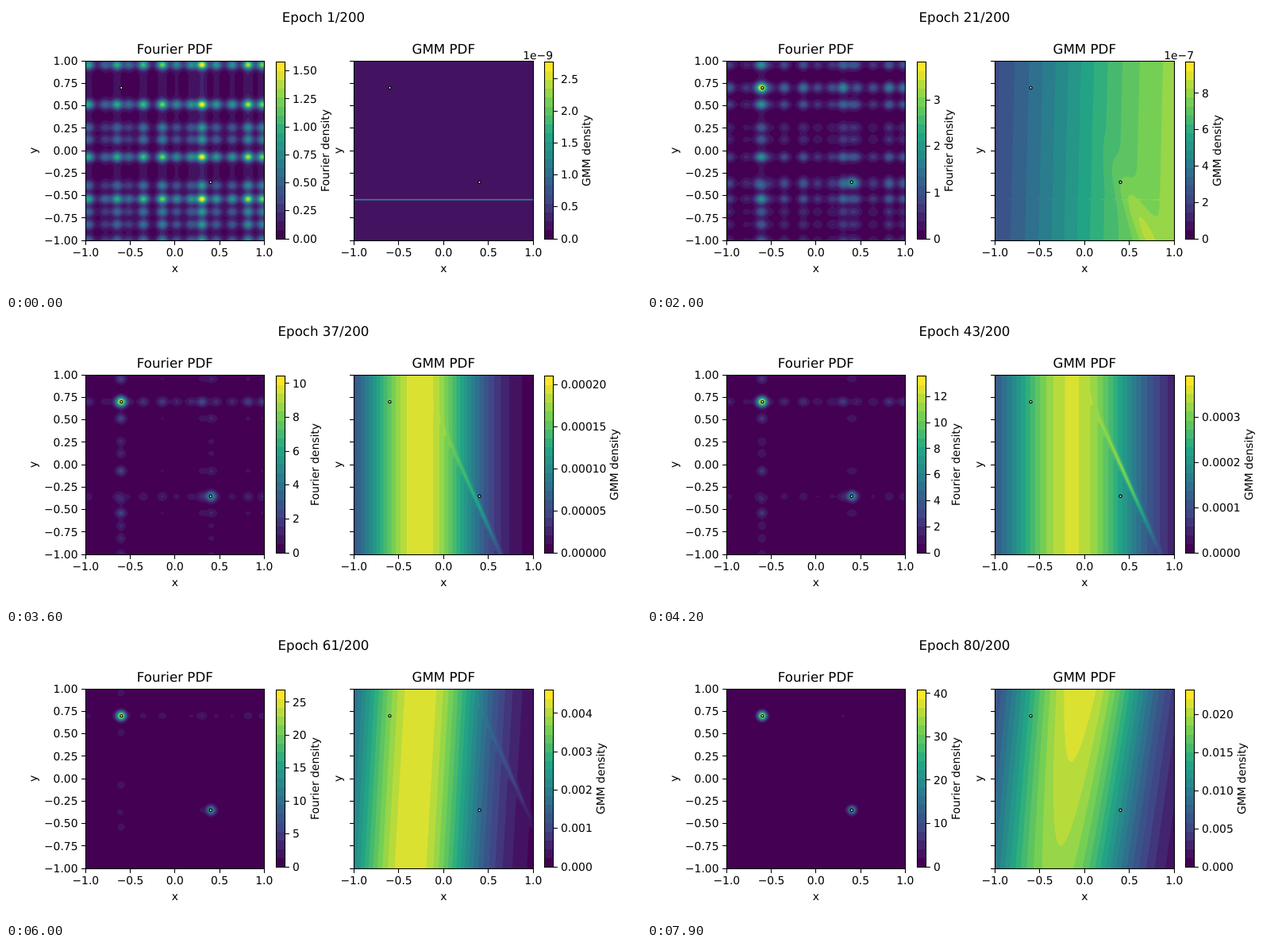
Recreate the animation shown at these times as an HTML page with a canvas. Size 800 by 360 pixels, loop 8 s.

```html
<!DOCTYPE html>
<html lang="en">
<head>
<meta charset="utf-8">
<title>Density training</title>
<style>
  html, body { margin: 0; width: 100%; height: 100%; overflow: hidden; background: #fff; }
  #stage { position: relative; width: 800px; height: 360px; }
  canvas { position: absolute; top: 69px; width: 226px; height: 226px; }
  #fourier { left: 100px; }
  #gmm { left: 438px; }
  svg { position: absolute; left: 0; top: 0; }
  text { font: 13.89px "DejaVu Sans", sans-serif; fill: #000; text-rendering: geometricPrecision; }
  .title { font-size: 16.67px; }
</style>
</head>
<body>
<div id="stage">
  <canvas id="fourier" width="452" height="452"></canvas>
  <canvas id="gmm" width="452" height="452"></canvas>
  <svg width="800" height="360" viewBox="0 0 800 360">
    <g id="axes"></g>
    <g id="live"></g>
  </svg>
</div>
<script>
const SIZE = 452, BANDS = 20, STEP_MS = 100, EPOCHS = 80;
const TOP = 69, BOTTOM = 295, BAR_TOP = 71, BAR_BOTTOM = 293;
const POINTS = [{ x: -0.6, y: 0.7 }, { x: 0.4, y: -0.35 }];

const mix = (a, b, u) => a + (b - a) * u;
const bell = d => Math.exp(-d * d / 2);
const coord = i => 2 * (i + 0.5) / SIZE - 1;
const snap = v => Math.floor(v) + 0.5;

// Linear motion through [epoch, value] points, held at both ends.
function track(...points) {
  return epoch => {
    const next = points.findIndex(p => p[0] > epoch);
    if (next < 0) return points[points.length - 1][1];
    if (next === 0) return points[0][1];
    const [e0, v0] = points[next - 1], [e1, v1] = points[next];
    return mix(v0, v1, (epoch - e0) / (e1 - e0));
  };
}
function logTrack(...points) {
  const log = track(...points.map(([e, v]) => [e, Math.log(v)]));
  return epoch => Math.exp(log(epoch));
}

const fourierMax = logTrack([1, 1.575], [14, 2.374], [29, 6.57], [37, 10.42], [50, 18.4], [61, 26.8], [80, 40.7]);
const gmmMax = logTrack([1, 2.76e-9], [14, 6.5e-8], [29, 2.13e-5], [37, 2.1e-4], [50, 8.07e-4], [61, 4.6e-3], [80, 0.0232]);

const broad = {
  centre: track([14, 1.6], [29, 0.8], [37, -0.26], [50, 0], [61, -0.31], [80, -0.17]),
  lean: track([14, 0.045], [29, 0], [45, 0], [80, 0.125]),
  sharp: track([1, 0], [14, 0.54], [29, 0.89], [37, 2.13], [50, 1.36], [61, 1.87], [80, 1.72]),
  amp: track([1, 0.075], [14, 0.87], [29, 0.78], [37, 0.945], [50, 0.866], [61, 0.95], [80, 0.89]),
  tilt: track([61, 0], [80, 0.06])
};
const ridge = {
  centre: track([29, 0.27], [37, 0.19], [50, 0.65], [61, 0.77]),
  width: track([29, 0.085], [37, 0.018]),
  amp: track([14, 0], [29, 0.2], [37, 0.22], [50, 0.38], [61, 0.1], [80, 0]),
  middle: track([29, -0.8], [50, 0])
};
const lineAmp = track([1, 0.5], [14, 0.05], [25, 0]);

// Ripple crests of each axis, in stage pixels.
const X = { strong: [104, 140, 173, 197, 247, 305, 323], weak: [125, 155, 215, 233, 265, 285],
            origin: 100, width: 4.6, height: c => 0.55 + 0.45 * bell((c - 260) / 50) };
const Y = { strong: [74, 124, 190, 243], weak: [153, 168, 226, 259, 275, 295],
            origin: TOP, width: 4, height: () => 0.8 };

const VIRIDIS = ["440154", "414487", "2a788e", "22a884", "7ad151", "fde725"]
  .map(hex => [0, 2, 4].map(i => parseInt(hex.slice(i, i + 2), 16)));
const palette = Array.from({ length: BANDS }, (_, i) => {
  const pos = i / (BANDS - 1) * 5, k = Math.min(4, Math.floor(pos));
  return VIRIDIS[k].map((c, j) => Math.round(mix(c, VIRIDIS[k + 1][j], pos - k)));
});
const packed = palette.map(([r, g, b]) => (255 << 24 | b << 16 | g << 8 | r) >>> 0);

function rippleProfile(axis) {
  return Float64Array.from({ length: SIZE }, (_, i) => {
    const px = axis.origin + (i + 0.5) / 2;
    const sum = crests => crests.reduce((s, c) => s + axis.height(c) * bell((px - c) / axis.width), 0);
    return 0.1 + sum(axis.strong) + 0.5 * sum(axis.weak);
  });
}
const rippleX = rippleProfile(X), rippleY = rippleProfile(Y);

// Each term is a product of fading ripples plus a growing peak on its point.
function fourierField(epoch) {
  const fade = 0.83 * Math.exp(-0.035 * epoch);
  const grow = Math.min(1, (epoch - 1) / 28);
  const sigma = 0.041 * (1 - 0.0025 * epoch);
  const blend = (ripple, at, sign) =>
    ripple.map((r, i) => fade * r + grow * bell((sign * coord(i) - at) / sigma));
  const [a, b] = POINTS.map(p => ({ x: blend(rippleX, p.x, 1), y: blend(rippleY, p.y, -1) }));
  const value = (i, j) => a.x[i] * a.y[j] + 0.5 * b.x[i] * b.y[j];
  let max = 0;
  for (let j = 0; j < SIZE; j += 2)
    for (let i = 0; i < SIZE; i += 2) max = Math.max(max, value(i, j));
  return (i, j) => value(i, j) / max;
}

function gmmField(epoch) {
  const sharp = broad.sharp(epoch), width = ridge.width(epoch);
  const rows = Array.from({ length: SIZE }, (_, j) => {
    const y = -coord(j);
    return {
      centre: broad.centre(epoch) + broad.lean(epoch) * y,
      amp: broad.amp(epoch) * (1 + broad.tilt(epoch) * y),
      ridge: ridge.centre(epoch) - 0.45 * y,
      ridgeAmp: ridge.amp(epoch) * bell((y - ridge.middle(epoch)) / 0.4),
      line: lineAmp(epoch) * bell((y + 0.547) / 0.0045)
    };
  });
  return (i, j) => {
    const r = rows[j], x = coord(i);
    return r.amp * bell((x - r.centre) * sharp) + r.ridgeAmp * bell((x - r.ridge) / width) + r.line;
  };
}

function surface(id) {
  const ctx = document.getElementById(id).getContext("2d");
  const image = ctx.createImageData(SIZE, SIZE);
  const pixels = new Uint32Array(image.data.buffer);
  return field => {
    for (let j = 0, n = 0; j < SIZE; j++)
      for (let i = 0; i < SIZE; i++)
        pixels[n++] = packed[Math.min(BANDS - 1, Math.floor(field(i, j) * BANDS))];
    ctx.putImageData(image, 0, 0);
  };
}

const text = (x, y, str, anchor = "middle", cls = "") =>
  `<text x="${x}" y="${y}" text-anchor="${anchor}" class="${cls}">${str}</text>`;
const upright = (x, y, str) =>
  `<text transform="translate(${x} ${y}) rotate(-90)" text-anchor="middle">${str}</text>`;
const tick = (x, y, dx, dy) =>
  `<path d="M${x} ${y}l${dx} ${dy}" stroke="#000" stroke-width="1.1"/>`;
const frame = (x, y, w, h) =>
  `<rect x="${x}" y="${y}" width="${w}" height="${h}" fill="none" stroke="#000" stroke-width="1.1"/>`;
const signed = (v, digits) => (v < 0 ? "\u2212" : "") + Math.abs(v).toFixed(digits);
const beside = y => Math.round(y + 4.7);

function panel(left, right, title, labelled) {
  const px = v => mix(left + 0.3, right + 0.3, (v + 1) / 2);
  const py = v => mix(BOTTOM + 0.2, TOP + 0.2, (v + 1) / 2);
  let out = frame(left + 0.5, TOP + 0.5, right - left, BOTTOM - TOP);
  for (let v = -1; v <= 1; v += 0.5)
    out += tick(snap(px(v)), BOTTOM + 1, 0, 4.9) + text(px(v), 315, signed(v, 1));
  for (let v = -1; v <= 1; v += 0.25) {
    out += tick(left, snap(py(v)), -4.9, 0);
    if (labelled) out += text(90.5, beside(py(v)), signed(v, 2), "end");
  }
  for (const p of POINTS)
    out += `<circle cx="${px(p.x)}" cy="${py(p.y)}" r="1.6" fill="#fff" stroke="#000" stroke-width="1.2"/>`;
  return out + text(px(0), 60, title, "middle", "title") + text(px(0), 335, "x") +
    upright(labelled ? 38.5 : 422.5, 182, "y");
}

function bar(left) {
  const h = (BAR_BOTTOM - BAR_TOP) / BANDS;
  return palette.map((c, i) =>
    `<rect x="${left}" y="${BAR_BOTTOM - (i + 1) * h}" width="11" height="${h}" fill="rgb(${c})" shape-rendering="crispEdges"/>`
  ).join("") + frame(left + 0.5, BAR_TOP - 0.5, 11, BAR_BOTTOM - BAR_TOP + 1);
}

function tickStep(max) {
  const unit = 10 ** Math.floor(Math.log10(max / 7));
  return [1, 2, 2.5, 5, 10].map(m => m * unit).find(s => max / s <= 7);
}

function barScale(left, max, name) {
  const step = tickStep(max), count = Math.floor(max / step + 1e-9);
  const exp = Math.floor(Math.log10(count * step) + 1e-9);
  const power = exp <= -5 ? exp : 0, unit = 10 ** power;
  const whole = v => Math.abs(v - Math.round(v)) < 1e-6;
  let digits = 0;
  while (!whole(step / unit * 10 ** digits)) digits++;
  let out = "", longest = 0;
  for (let k = 0; k <= count; k++) {
    const y = BAR_BOTTOM - k * step / max * (BAR_BOTTOM - BAR_TOP);
    const label = (k * step / unit).toFixed(digits);
    longest = Math.max(longest, label.length);
    out += tick(left + 12, snap(y), 4.9, 0) + text(left + 21, beside(y), label, "start");
  }
  if (power) out += text(left + 11, 67, `1e\u2212${-power}`, "end");
  const width = digits ? (longest - 1) * 8.83 + 4.41 : longest * 8.83;
  return out + upright(left + 36 + width, 182, name);
}

document.getElementById("axes").innerHTML =
  panel(100, 325, "Fourier PDF", true) + panel(438, 664, "GMM PDF", false) + bar(340) + bar(678);

const live = document.getElementById("live");
const paintFourier = surface("fourier"), paintGmm = surface("gmm");
let shown = 0;

function render() {
  const epoch = Math.floor(performance.now() / STEP_MS) % EPOCHS + 1;
  if (epoch !== shown) {
    shown = epoch;
    paintFourier(fourierField(epoch));
    paintGmm(gmmField(epoch));
    live.innerHTML = text(400, 20, `Epoch ${epoch}/200`, "middle", "title") +
      barScale(340, fourierMax(epoch), "Fourier density") +
      barScale(678, gmmMax(epoch), "GMM density");
  }
  requestAnimationFrame(render);
}
render();
</script>
</body>
</html>
```
